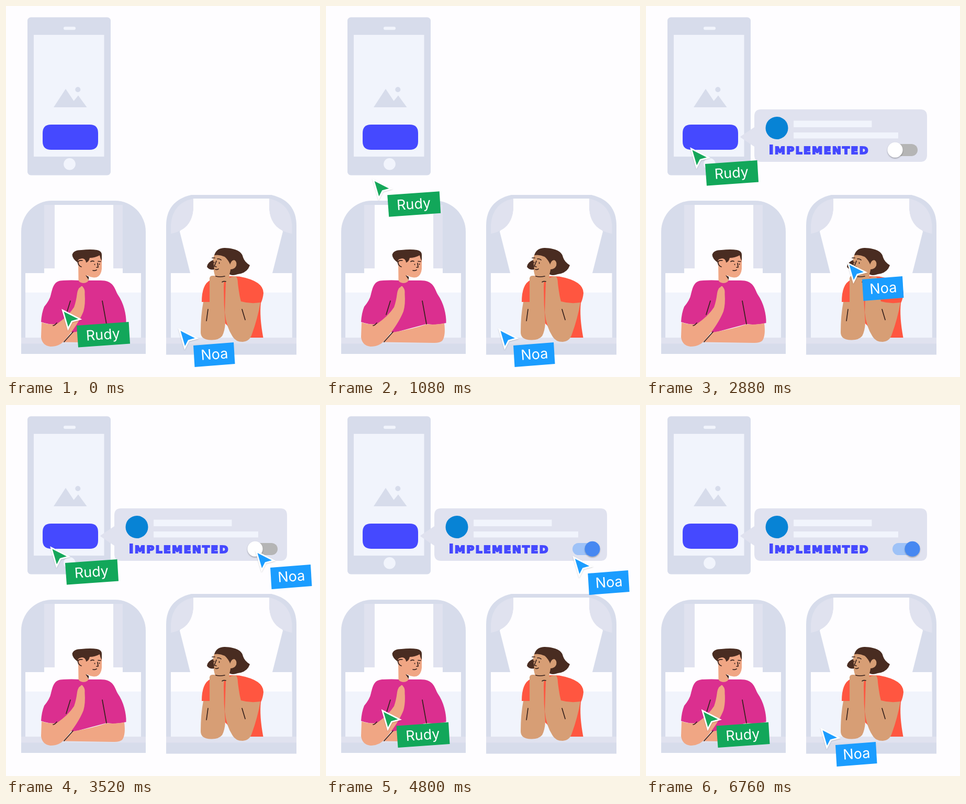
Write an HTML page that moves like this. It is 600x707 px and loops after 6.8 s.

```html
<!DOCTYPE html>
<html lang="en">
<head>
<meta charset="utf-8">
<title>Team handoff</title>
<style>
html, body { margin: 0; width: 100%; height: 100%; overflow: hidden; background: #fefdff }
svg { display: block; width: 600px; height: 707px }
.frame { fill: #d7dceb } .soft { fill: #e0e2ef } .pale { fill: #f1f4fc } .white { fill: #fefdff }
.hair { fill: #492c21 }
.ink { fill: none; stroke: #38221d; stroke-width: 1.7; stroke-linecap: round; stroke-linejoin: round }
.name { font: 27px Inter, sans-serif; fill: #fff; text-anchor: middle }
.status { font: bold 20px "DejaVu Sans", sans-serif; letter-spacing: 2.55px; fill: #4549ff; stroke: #4549ff; stroke-width: 2.2 }
</style>
</head>
<body>
<svg viewBox="0 0 600 707">
  <defs>
    <path id="arrow" d="M110.5 582.5L138 596.500L125 600L119 611.5Z" stroke="#fff" stroke-width="5.4" paint-order="stroke"/>
    <filter id="shade" x="-40%" y="-40%" width="180%" height="190%">
      <feDropShadow dx="0" dy="1.5" stdDeviation="1.3" flood-opacity=".35"/>
    </filter>
    <filter id="halo" x="-50%" y="-50%" width="200%" height="200%">
      <feDropShadow dx="0" dy="1" stdDeviation="1" flood-opacity=".2"/>
    </filter>
  </defs>

  <!-- phone -->
  <rect class="frame" x="41" y="21.500" width="159" height="301" rx="6.500"/>
  <rect class="pale" x="53" y="55" width="134.500" height="232"/>
  <rect class="pale" x="110" y="39.500" width="23" height="6" rx="3"/>
  <circle class="pale" cx="121.500" cy="301.300" r="11.300"/>
  <path class="frame" d="M91 193L114 158L129.500 181L138 170.500L154.500 193Z"/>
  <circle class="frame" cx="137.300" cy="159.300" r="5"/>
  <path fill="#4549ff" d="M86 226H160Q176 226 176 242V258Q176 274 160 274H86Q70 274 70 258V242Q70 226 86 226Z"/>

  <!-- card -->
  <g id="card">
    <path class="soft" d="M220 197H524Q537 197 537 210V284Q537 297 524 297H220Q207 297 207 284V268L181.500 251Q179.500 249.500 181.500 248L207 231V210Q207 197 220 197Z"/>
    <circle cx="250" cy="232.500" r="21.500" fill="#0783d5"/>
    <path class="pale" d="M282 218.500H431.500V231H282ZM282 241H482V252.500H282Z"/>
    <text class="status" x="235" y="281.500"><tspan font-size="23">I</tspan>MPLEMENTED</text>
    <rect id="track" x="471" y="263" width="48" height="23" rx="11.500"/>
    <circle id="knob" cy="274.300" r="14.500" filter="url(#shade)"/>
  </g>

  <!-- left window -->
  <path class="frame" d="M29 663V430A59 59 0 0 1 88 371H208A59 59 0 0 1 267 430V663Z"/>
  <path class="soft" d="M73 379H223V509H73Z"/>
  <path class="white" d="M93 379H205V500H223V509H258V632H37V509H73V500H93Z"/>
  <path class="pale" d="M37 546H258V632H37Z"/>
  <path class="soft" d="M29 632H267V643.500H29Z"/>

  <!-- man -->
  <path fill="#db2f8f" d="M110 523Q125 522 140 523H178C204 522 207 536 213 549Q222 562 226 577Q230 592 229.500 604Q212 609 192 606L128 623L97 607Q80 607 67 602Q68 585 73 573Q84 560 86 549C90 534 92 523 110 523Z"/>
  <g fill="#f0a684">
    <path d="M127 622Q165 616 192 606.500Q212 608 226 604.500Q229 629 222 638Q217 642.500 205 642L111 640.500Z"/>
    <path d="M68 603Q83 608 97 606Q119 591 130 574Q134 563 136 547Q138 537 142 536Q145 531 148 537Q151 540 150.500 549Q152 568 148 582Q138 607 113 636Q103 649 85 649Q69 647 67 631Z"/>
    <path d="M138 484Q152 474 183 475V501Q181 518 168 517.500Q162 517 154 513L158 522Q156 528 147 528Q140 527 138.500 523Z"/>
  </g>
  <path class="hair" d="M137 489Q127 482 126.500 474Q129 465 144 465Q162 463 174 465Q183 467 183 474V486Q180 481 179 475Q170 480 160 480Q158 488 153 489Q152 481 145 481Q139 482 137 489Z"/>
  <path fill="#f0a684" d="M151 488Q144 478 138 484Q135 491 140 497Q146 501 151 496Z"/>
  <path fill="#38221d" d="M152 513L158 516V522Z"/>
  <path class="ink" d="M146 485Q136 484 138 491Q140 496 144 497M162 487Q165 485 168 486.500M176 486.500L181 487M175 490L176 498L173 498M166 504Q170 505 173 503M123 562L115 588M97 604Q93 609 90 609M111 640L128 621M184 562L192 606"/>
  <path class="ink" stroke-width="3" d="M169.500 492V493M178.500 491.500V492.500"/>

  <!-- right window -->
  <path class="frame" d="M306 664.500V419Q306 371 354 360H507Q555 371 555 419V664.500Z"/>
  <path class="white" d="M358 367H503L529 430L509 509H546.500V632H315V509H352L332 430Z"/>
  <path class="soft" d="M358 367V389Q355 426 315 434V416Q319 375 358 367ZM503 367V389Q506 426 546.500 434V416Q542 375 503 367Z"/>
  <path class="white" d="M358 367H503V389Q506 417 529 430H332Q355 417 358 389Z"/>
  <path class="pale" d="M315 546H546.500V632H315Z"/>
  <path class="soft" d="M306 632H555V643.500H306Z"/>

  <!-- woman -->
  <path fill="#ff5640" d="M374 564Q374 530 391 522Q414 513 446 515.500Q492 524 492 547Q491 558 487 566Q484 592 491.500 632H445L418 604L400 564Z"/>
  <g fill="#d79e75">
    <path d="M396 481Q398 467 414 469Q439 478 441 492Q440 508 427 512V526H402L399 513Q395 500 396 481Z"/>
    <path d="M389 522Q388 513 396 514Q410 514 417 520L416 536Q416 570 419 604Q418 620 413 629Q406 637 392 636.500Q372 636 372 622Q372 590 377 564H389Z"/>
    <path d="M420 526Q424 516 439 515Q443 518 443 529Q446 553 449 563Q467 568 486 565Q481 595 470 625Q466 639 452 640Q439 640 433 630Q421 612 418 584Z"/>
  </g>
  <path class="hair" d="M398 475Q402 461 418 461C440 462 451 468 453 479Q456 488 466 494Q461 509 443 511Q432 515 427 511Q430 503 429 494Q425 484 418 478Q408 473 398 475ZM396 484Q385 488 384 497Q388 504 398 502Z"/>
  <path fill="#d79e75" d="M428 495Q429 485 436 484Q442 487 440 495Q437 502 428 502Z"/>
  <path class="ink" d="M394 480L399 480M404 482Q408 481 411 484M402 486L398 496L402 497M400 502Q404 503 406 501M401 515Q408 517 418 515M413 526Q415 524 420 525M386 578L383 600M451 578L457 598"/>
  <path class="ink" stroke-width="3" d="M407.500 489V490.500M397.500 488V489"/>

  <!-- cursors -->
  <g id="green" fill="#12a75a">
    <use href="#arrow" filter="url(#halo)"/>
    <path d="M135 609L234.500 602L237 643.500L138 650.500Z"/>
    <text class="name" transform="translate(186 635.500) rotate(-4)">Rudy</text>
  </g>
  <g id="blue" fill="#1b9dff">
    <use href="#arrow" x="223" y="36.500" filter="url(#halo)"/>
    <path d="M358 647L435 641L437.500 682L360.500 688Z"/>
    <text class="name" transform="translate(399 673) rotate(-4)">Noa</text>
  </g>
</svg>
<script>
const LOOP = 6800, MOVE = 800;
const $ = id => document.getElementById(id);
const mix = (a, b, p) => a + (b - a) * p;
const color = (a, b, p) => `rgb(${a.map((v, i) => Math.round(mix(v, b[i], p)))})`;

// Cubic ease in and out, beginning at the given time.
function step(t, start) {
  const u = Math.min(1, Math.max(0, (t - start) / MOVE));
  return u < .5 ? 4 * u ** 3 : 1 - 4 * (1 - u) ** 3;
}

// Out to the far point, then back to a rest point.
function travel(id, out, back, far, rest) {
  const [x, y] = far.map((v, i) => mix(v * out, rest[i], back));
  $(id).setAttribute('transform', `translate(${x} ${y})`);
}

function draw(t) {
  const toggle = step(t, 3802);
  travel('green', step(t, 572), toggle, [-22, -308], [-.5, 2.5]);
  travel('blue', step(t, 2518), step(t, 4640), [147, -337], [4, 1]);
  $('card').setAttribute('opacity', step(t, 1665));
  $('track').setAttribute('fill', color([181, 181, 181], [158, 194, 247], toggle));
  $('knob').setAttribute('fill', color([255, 255, 255], [70, 136, 241], toggle));
  $('knob').setAttribute('cx', mix(476, 509, toggle));
}

const begin = performance.now();
function tick() {
  draw((performance.now() - begin) % LOOP);
  requestAnimationFrame(tick);
}
tick();
</script>
</body>
</html>
```
